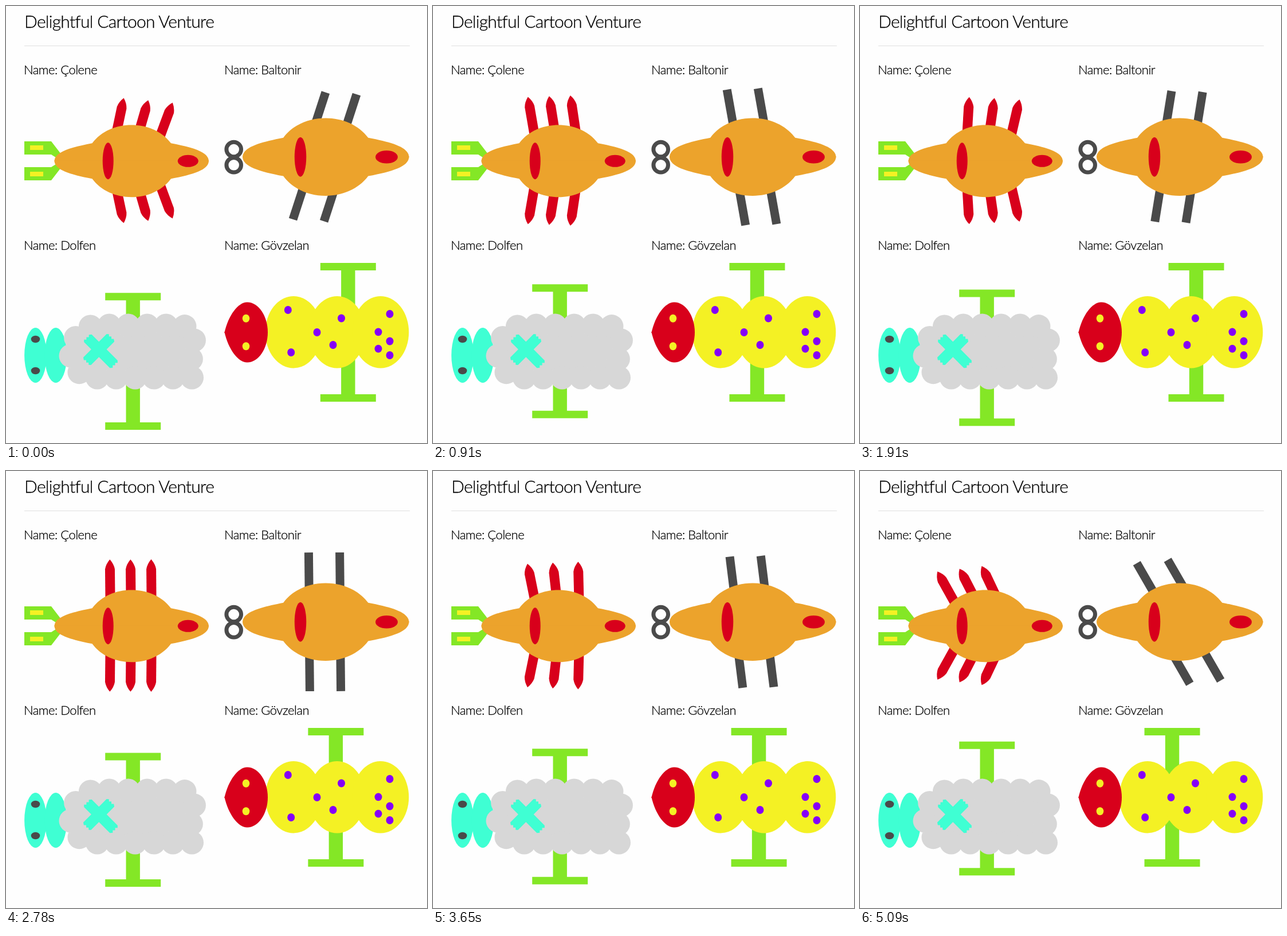
An HTML page that plays this animation: 735x762 px, repeating every 5140 ms.

```html
<!DOCTYPE html>
<html lang="en">
<head>
<meta charset="utf-8">
<title>Delightful Cartoon Venture</title>
<style>
  html, body { margin: 0; width: 100%; height: 100%; overflow: hidden; background: #fefefe; }
  svg { display: block; }
  text { font: 300 22px Lato, "Open Sans", sans-serif; letter-spacing: -.5px; stroke: #000; stroke-width: .3px; }
  .title { font-size: 30px; letter-spacing: -.7px; }
  .green { fill: #84e726; }
  .yellow { fill: #f4f124; }
  .red { fill: #d8001b; }
  .dark { fill: #4a4a4a; }
  .cyan { fill: #3fffd3; }
  .purple { fill: #8500f8; }
  .orange { fill: #eca32c; }
  .wool { fill: #d7d7d7; stroke: #d7d7d7; stroke-width: 41; stroke-linecap: round; stroke-dasharray: 0 1; }
</style>
</head>
<body>
<svg width="735" height="762" viewBox="0 0 735 762">
  <defs>
    <path id="halfFish" class="orange" d="M0 1V0C.5-15.5 27-23.5 66-31 97-73.5 172-73.5 203.5-31 243-23.5 269-15.5 269.5 0V1z"/>
    <g id="fish">
      <use href="#halfFish"/>
      <use href="#halfFish" transform="scale(1 -1)"/>
      <ellipse class="red" cx="93.700" rx="9.5" ry="32"/>
      <ellipse class="red" cx="233.300" rx="18" ry="10.5"/>
    </g>
    <g id="claw">
      <path class="green" d="M32-34H79L96-12 90-4 79-11H32z"/>
      <path class="yellow" d="M42-27H65V-19H42z"/>
    </g>
    <path id="spike" class="red" d="M0-94Q7-86 8.5-77V-8H-8.5V-77Q-7-86 0-94"/>
    <path id="bar" class="dark" d="M-7.5-86h15V0h-15z"/>
    <path id="foot" class="green" d="M-48.5 0h97V13H12.2V121h-24.4V13H-48.5z"/>
    <path id="plaster" class="cyan" d="M-32-9.5H32l3 3-3 3 3 3-3 3 3 3-3 4H-32l-3-3 3-3-3-3 3-3-3-3z"/>
    <path id="halfHead" class="red" d="M381.500 1V0C388-29 405-52.500 421-52.500 441-52.500 457-28 457 0V1z"/>
  </defs>

  <text class="title" x="32" y="38">Delightful Cartoon Venture</text>
  <path d="M32 69.5H705" stroke="#e0e0e0"/>
  <text x="31" y="119">Name: Çolene</text>
  <text x="381" y="119">Name: Baltonir</text>
  <text x="31" y="425">Name: Dolfen</text>
  <text x="381" y="425">Name: Gövzelan</text>

  <use href="#claw" transform="translate(0 270)"/>
  <use href="#claw" transform="translate(0 270) scale(1 -1)"/>
  <g id="spikes"></g>
  <use href="#fish" x="84.500" y="270.300"/>

  <g fill="none" stroke="#4a4a4a" stroke-width="7">
    <circle cx="397.700" cy="250" r="12.800"/>
    <circle cx="397.700" cy="277.300" r="12.800"/>
  </g>
  <g id="bars"></g>
  <use href="#fish" transform="translate(413 263.2) scale(1.078)"/>

  <use id="sheepTop" href="#foot"/>
  <use id="sheepBottom" href="#foot"/>
  <g id="sheepHead" class="cyan"></g>
  <g id="sheepEyes" class="dark"></g>
  <path class="wool" pathLength="17" d="M113 610Q115 565 155 557H310L330 573 323 618 325 648H155Q118 645 113 610z"/>
  <use href="#plaster" transform="translate(165.5 602) rotate(45)"/>
  <use href="#plaster" transform="translate(162 599) rotate(-45) scale(.9 1)"/>

  <g id="bugLegs">
    <use href="#foot" y="448"/>
    <use href="#foot" transform="translate(0 690) scale(1 -1)"/>
  </g>
  <g id="bugBody" class="yellow"></g>
  <use href="#halfHead" y="569"/>
  <use href="#halfHead" transform="translate(0 569) scale(1 -1)"/>
  <g id="bugEyes" class="yellow"></g>
  <g id="spots" class="purple"></g>
</svg>
<script>
const $ = id => document.getElementById(id);

function add(parent, tag, attributes) {
  const node = document.createElementNS("http://www.w3.org/2000/svg", tag);
  for (const name in attributes) node.setAttribute(name, attributes[name]);
  return parent.appendChild(node);
}
const place = (node, transform) => node.setAttribute("transform", transform);
const ellipse = (id, cx, cy, rx, ry) => add($(id), "ellipse", { cx, cy, rx, ry });
const spot = (x, y) => ellipse("spots", x, y, 6.5, 6.9);

for (const side of [-1, 1]) {
  ellipse("sheepHead", 69.2 + side * 17.7, 609, 19.4, 48);
  ellipse("sheepEyes", 51.5, 608.5 + side * 27.5, 7.8, 6.2);
  ellipse("bugEyes", 419, 569 + side * 24.3, 6.3, 7);
  spot(495 + side * 2.7, 567 + side * 37);
}
for (let i = 0; i < 3; i++) ellipse("bugBody", 502 + i * 76, 568.7, 49.3, 62.7);
for (let i = 0; i < 5; i++) spot(i % 2 ? 650 : 670, 537 + 72 * (i / 4) ** .6);
spot(543, 569);
spot(585.5, 544.5);
spot(571, 591);

function addLegs(id, shape, count) {
  return [1, -1].map(side => {
    const group = add($(id), "g", {});
    const legs = Array.from({ length: count }, () => add(group, "use", { href: shape }));
    return { side, group, legs };
  });
}
const spikes = addLegs("spikes", "#spike", 3);
const bars = addLegs("bars", "#bar", 2);

// Eased walk cycle, 0 to 4: rest, back, passing, front, rest
function walkPhase(time) {
  const phase = (time + 1235) % 2000 / 500;
  const from = Math.floor(phase), part = phase - from;
  return from + .4 * part + .3 * (1 - Math.cos(Math.PI * part));
}

function draw() {
  const phase = walkPhase(performance.now() % 5140);
  const swing = -Math.asin(Math.sin(phase * Math.PI / 2)) * 2 / Math.PI;
  const passing = 1 - Math.abs(phase - 2) / 2;
  const forward = Math.max(0, Math.min((phase - 1) / 2, 4 - phase));
  const lifted = Math.min(1, phase, 4 - phase);
  const angle = range => range * swing - 2 * Math.abs(swing);

  const spikeAngle = angle(37);
  const spikeLift = 4.5 * lifted + 4 * Math.abs(swing);
  for (const { side, group, legs } of spikes) {
    place(group, `translate(218.3 269.5) scale(1 ${side}) rotate(${.2 * spikeAngle})`);
    legs.forEach((leg, i) => {
      const offset = i - 1;
      place(leg, `translate(${offset * 36 + 4 * forward} ${spikeLift - 21.5})
        rotate(${.8 * spikeAngle + offset * 5.5 * passing})`);
    });
  }

  const barAngle = angle(41);
  for (const { side, group, legs } of bars) {
    place(group, `translate(556.5 263) rotate(${.2 * barAngle + (side < 0 ? 180 : 0)})`);
    legs.forEach((leg, i) => place(leg,
      `translate(${(i - .5) * 54.2} ${6 * lifted - 35}) rotate(${.8 * barAngle})`));
  }

  const sheepStep = 29 * swing;
  place($("sheepTop"), `translate(221.7 ${492 + sheepStep - 7 * forward})`);
  place($("sheepBottom"), `translate(221.7 ${725.5 + sheepStep}) scale(1 -1)`);
  place($("bugLegs"), `translate(${576.5 + 45 * swing} 0)`);
  requestAnimationFrame(draw);
}
draw();
</script>
</body>
</html>
```
